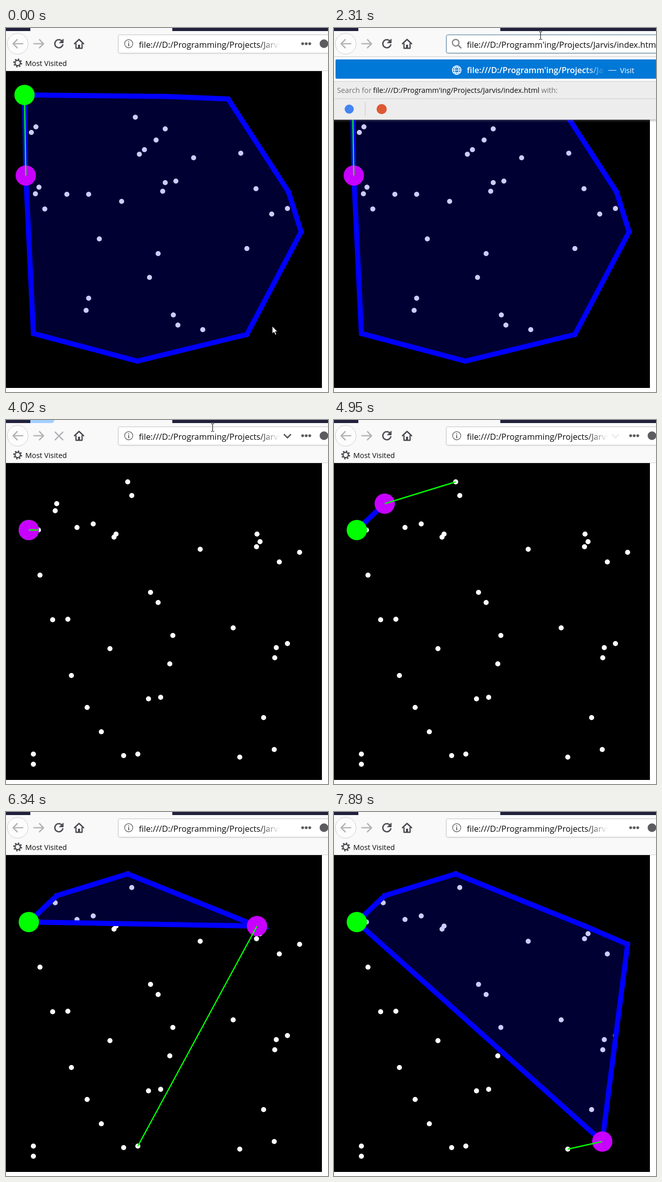
An HTML page with a canvas that plays this animation: 635x718 px, repeating every 8 s.

```html
<!DOCTYPE html>
<html lang="en">
<head>
<meta charset="utf-8">
<title>Jarvis march</title>
<style>
html, body { margin: 0; width: 100%; height: 100%; overflow: hidden; background: #fff; }
canvas { display: block; }
</style>
</head>
<body>
<canvas id="stage" width="635" height="718"></canvas>
<script>
const c = document.getElementById('stage').getContext('2d');
const FONT = '"Open Sans", "Noto Sans", sans-serif';
const INK = '#4a4a50', PALE = '#b4b4b7';

// Moments at which the screen refreshes.
const TICKS = [0, 70, 140, 210, 440, 520, 590, 670, 740, 820, 1070, 1220, 1760, 2310,
  2610, 2860, 3090, 3390, 3790, 3870, 3940, 4020, 4100, 4170, 4250, 4330, 4400, 4630,
  4710, 4790, 4870, 4950, 5330, 5500, 5570, 5650, 5720, 5800, 5870, 6040, 6270, 6340,
  6500, 6580, 6660, 6740, 6970, 7050, 7200, 7280, 7350, 7430, 7890];

// Both point sets begin with their leftmost point.
const pairs = a => a.flatMap((x, i) => i % 2 ? [] : [[x, a[i + 1]]]);
const FIRST = pairs([36.5, 132, 39, 291, 50, 206, 54, 602.5, 58, 327, 59, 195, 65, 314,
  76.5, 357, 120, 328, 158, 557, 163, 328, 163, 533, 184, 416, 228, 342, 255, 176,
  259, 657, 263, 249, 273, 240, 283, 492, 296, 221, 300, 445, 309, 322, 314, 199,
  314, 305, 315, 135, 330, 566, 335, 302, 339, 586, 370, 256, 388, 595, 438, 140,
  463, 247, 475, 435, 475, 604.5, 493, 317, 524, 367, 555, 356, 557, 323, 582, 402]);
const SECOND = pairs([45, 217, 54, 659, 54, 679, 64, 217, 67, 306, 92, 394, 97, 179,
  100, 165, 122, 393, 129, 504, 140, 212, 160, 567, 172, 205, 188, 615, 205, 451,
  213, 231, 217, 225, 232, 662, 240, 122, 248, 149, 260, 659, 281, 550, 285, 340,
  300, 360, 305, 547, 323, 481, 329, 425, 383, 255, 448, 410, 461, 665, 494, 250,
  495, 225, 501, 240, 508, 587, 530, 469, 529, 650, 533, 449, 539, 280, 555, 441,
  579, 261]);

const clamp = v => Math.max(0, Math.min(1, v));

// Outermost point seen from `from` after checking points 0..n.
function scan(pts, from, n) {
  let best = pts[0];
  for (let i = 1; i <= n && i < pts.length; i++) {
    const p = pts[i];
    if (p === from) continue;
    const cross = (best[0] - from[0]) * (p[1] - from[1]) - (best[1] - from[1]) * (p[0] - from[0]);
    if (best === from || cross < 0) best = p;
  }
  return best;
}

function march(pts, steps, n) {
  const hull = [pts[0]];
  while (hull.length <= steps) {
    const next = scan(pts, hull[hull.length - 1], pts.length);
    if (next === pts[0]) break;
    hull.push(next);
  }
  return { pts, hull, aim: scan(pts, hull[hull.length - 1], n) };
}

function sceneAt(t) {
  if (t < 3940) return march(FIRST, 99, 99);
  const each = 702, start = 4562;
  if (t < start) return march(SECOND, 0, Math.floor((t - 3940) / 17.55));
  const run = t - start;
  return march(SECOND, 1 + Math.floor(run / each), Math.floor(run % each / 17.55));
}

function rect(color, x, y, w, h) {
  c.fillStyle = color;
  c.fillRect(x, y, w, h);
}
function disc(color, x, y, r) {
  c.fillStyle = color;
  c.beginPath();
  c.arc(x, y, r, 0, 7);
  c.fill();
}
function draw(d, color, width, fill) {
  const p = new Path2D(d);
  if (fill) { c.fillStyle = fill; c.fill(p); }
  if (color) { c.strokeStyle = color; c.lineWidth = width; c.stroke(p); }
}
function ring(color, x, y, r, width) {
  c.strokeStyle = color;
  c.lineWidth = width;
  c.beginPath();
  c.arc(x, y, r, 0, 7);
  c.stroke();
}
function box(x, y, w, h, r, fill, edge) {
  c.beginPath();
  c.roundRect(x, y, w, h, r);
  c.fillStyle = fill;
  c.fill();
  if (edge) { c.strokeStyle = edge; c.lineWidth = 1; c.stroke(); }
}
function text(s, x, y, size, color, weight = 400) {
  c.font = `${weight} ${size}px ${FONT}`;
  c.fillStyle = color;
  c.fillText(s, x, y);
}
function fade(x0, x1, rgb) {
  const g = c.createLinearGradient(x0, 0, x1, 0);
  g.addColorStop(0, `rgb(${rgb})`);
  g.addColorStop(1, `rgba(${rgb},0)`);
  return g;
}

function page({ pts, hull, aim }) {
  rect('#fff', 0, 85, 635, 633);
  c.save();
  c.beginPath();
  c.rect(0, 85, 623, 625);
  c.clip();
  rect('#000', 0, 85, 623, 625);
  for (const p of pts) disc('#fff', ...p, 5);
  const tip = hull[hull.length - 1];
  if (hull.length > 1) draw('M' + hull.join('L') + 'Z', '#00f', 10, 'rgba(0,0,255,.2)');
  disc('#0f0', ...hull[0], 20);
  disc('#c800ff', ...tip, 20);
  draw(`M${tip}L${aim}`, '#0f0', 2.5);
  c.restore();
}

function toolbar(t) {
  rect('#f9f9fa', 0, 0, 635, 84);
  rect('#20203c', 0, 0, 48, 6);
  rect('#20203c', 328, 0, 307, 6);
  rect('#d8d8da', 0, 84, 635, 1);

  const burst = (t - 3940) / 80;
  if (burst > 0 && t < 4400) {
    c.save();
    c.beginPath();
    c.rect(48, 0, 280, 6);
    c.clip();
    c.globalAlpha = clamp((4400 - t) / 380);
    disc('#a2cfff', 62, -17, 38 * burst);
    c.restore();
  }

  disc('#fcfcfd', 23, 31, 20.5);
  ring('#cfcfd1', 23, 31, 20.5, 1);
  c.lineCap = c.lineJoin = 'round';
  draw('M33 31H15M22 23L14 31L22 39', PALE, 2.6);
  draw('M55 31H73M66 23L74 31L66 39', PALE, 2.6);
  if (t >= 3790 && t < 4330) {
    draw('M97 24L112 39M112 24L97 39', PALE, 2.6);
  } else {
    draw('M110.5 26A8 8 0 1 0 112 33', INK, 2.6);
    draw('M113 22V29.5H105.5Z', INK, 1, INK);
  }
  draw('M135 31L144 22.5L153 31', INK, 2.6);
  draw('M138 31V40H150V31', INK, 2.4);
  rect(INK, 142, 33, 4, 7);
  c.lineCap = 'butt';
  c.lineJoin = 'miter';

  ring(INK, 23, 69, 5.2, 2.4);
  c.setLineDash([3, 2.9]);
  ring(INK, 23, 69, 7.5, 2.6);
  c.setLineDash([]);
  text('Most Visited', 38, 75, 14.4, '#0c0c0d');
}

const typed = t => t >= 1070 && t < 2610 ? "'" : '';
const address = t => `file:///D:/Programm${typed(t)}ing/Projects/Jarvis/index.html`;

function magnifier() {
  ring('#8a8a8c', 240, 29, 6.5, 2.4);
  draw('M244.5 33.5L251 40', '#8a8a8c', 2.8);
}

function urlBar(t) {
  const focus = t >= 440 && t < 3790;
  c.save();
  c.shadowColor = 'rgba(0,0,0,.12)';
  c.shadowBlur = 3;
  c.shadowOffsetY = 1;
  box(221.5, 13.5, 460, 36, 3, '#fff');
  c.restore();
  box(221.5, 13.5, 460, 36, 3, '#fff', focus ? '#47708f' : '#c4c4c6');
  if (focus) {
    magnifier();
    const marked = t < 670;
    if (marked) rect('#0078d7', 262, 22, 373, 23);
    text(address(t), 262, 39, 16.45, marked ? '#fff' : '#0c0c0d');
    const caret = [[820, 1220], [1760, 2310], [2610, 2860], [3390, 3790]];
    if (caret.some(([a, b]) => t >= a && t < b)) rect('#000', typed(t) ? 416 : 412, 20, 1, 23);
    return;
  }
  ring('#6a6a6e', 242, 31, 8, 1.4);
  rect('#6a6a6e', 241, 30, 2, 6);
  rect('#6a6a6e', 241, 26.5, 2, 2);
  text(address(t), 262, 39, 16.45, fade(500, 540, '12,12,13'));
  const hover = t < 3790 ? clamp((t - 70) / 210) : t < 5330 ? 1 - .88 * clamp((t - 4630) / 320) : 0;
  c.globalAlpha = hover;
  draw('M548 28L555 35L562 28', '#5c5c60', 2.8);
  c.globalAlpha = 1;
  for (const x of [585, 592, 599]) disc('#5c5c60', x, 31, 2.8);
  disc('#5c5c60', 627, 31, 8.5);
}

function popup(t) {
  const shade = c.createLinearGradient(0, 181, 0, 186);
  shade.addColorStop(0, 'rgba(120,120,120,.4)');
  shade.addColorStop(1, 'rgba(120,120,120,0)');
  rect(shade, 0, 181, 635, 5);
  rect('#f9f9fa', 0, 56, 635, 50);
  rect('#ededed', 0, 106, 635, 75);
  for (const y of [56, 105, 139, 180]) rect('#cfcfcf', 0, y, 635, 1);
  box(3, 62, 640, 38, 2, '#0078d7');
  ring('#fff', 242, 83, 8.5, 1.6);
  draw('M233.5 83H250.5M235 78.5H249M235 87.5H249M242 74.5C236 80 236 86 242 91.5C248 86 248 80 242 74.5', '#fff', 1.4);
  text(address(t), 262, 89, 16.2, fade(497, 534, '255,255,255'), 600);
  rect('#fff', 541, 83, 16, 1);
  text('Visit', 564, 89, 14.5, '#fff');
  text('Search for ', 6, 128, 14.3, '#737373');
  text(address(t), 77, 128, 14.3, '#0c0c0d');
  text('with:', 77 + c.measureText(address(t) + ' ').width, 128, 14.3, '#737373');
  disc('#4285f4', 30, 160, 9);
  rect('#c8c8c8', 61, 146, 1, 28);
  disc('#de5833', 94, 160, 10);
}

function pointer(t) {
  if (t >= 4710) return;
  if (t < 210) {
    const k = t / 210;
    c.save();
    c.translate(525 - 105 * k, 588 - 560 * k * (2 - k) / 1.05);
    draw('M0 0V15L3.5 11.8L6 17.5L8.4 16.4L6 11H10.5Z', '#000', 1, '#fff');
    c.restore();
    return;
  }
  const k = clamp((t - 370) / 300);
  const x = Math.round(420 - 13 * k) + .5, y = Math.round(28 - 13 * k);
  draw(`M${x - 3} ${y - 7.5}H${x - .5}M${x + .5} ${y - 7.5}H${x + 3}M${x} ${y - 7}V${y + 7}` +
    `M${x - 3} ${y + 7.5}H${x - .5}M${x + .5} ${y + 7.5}H${x + 3}`, '#000', 1);
}

function frame(now) {
  const clock = now % 8000;
  const t = TICKS.filter(s => s <= clock).pop();
  page(sceneAt(t));
  toolbar(t);
  urlBar(t);
  if (t >= 1070 && t < 3090) popup(t);
  pointer(t);
}

const begin = performance.now();
function loop() {
  frame(performance.now() - begin);
  requestAnimationFrame(loop);
}
loop();
</script>
</body>
</html>
```
